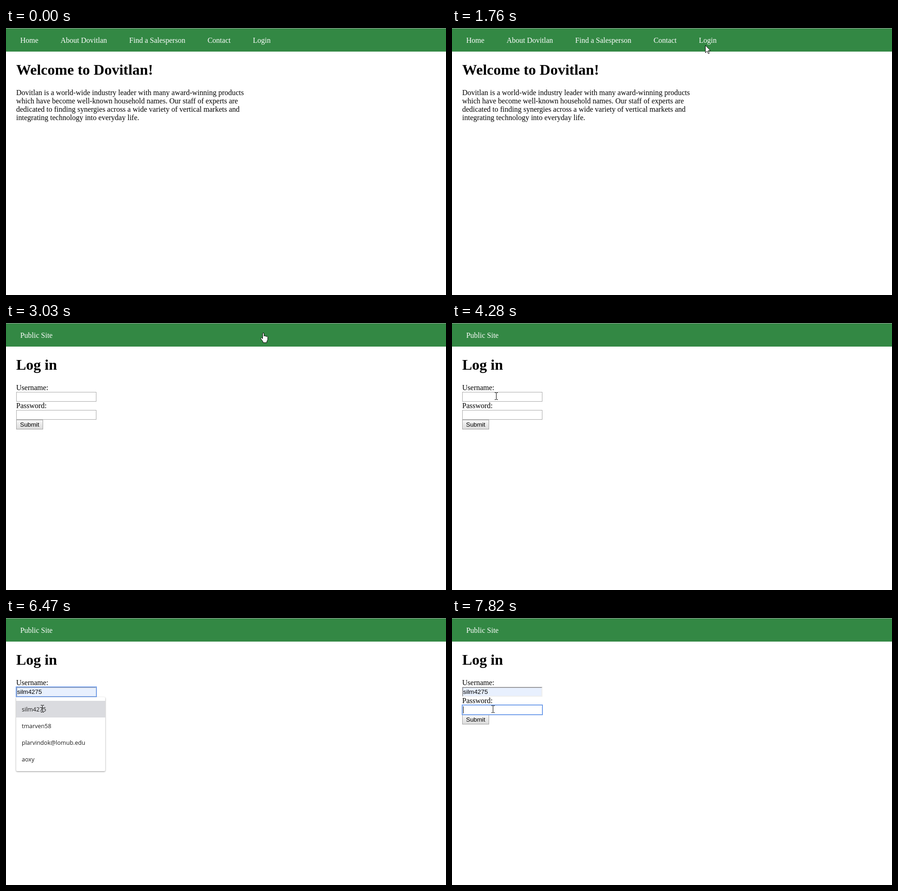
Animation, 949 px wide and 577 px high, one loop 8000 ms. Source, as an HTML page:

```html
<!DOCTYPE html>
<html lang="en">
<head>
<meta charset="utf-8">
<title>Log in</title>
<style>
* { box-sizing: border-box; }
html, body { margin: 0; height: 100%; overflow: hidden; background: #fff; }
body { font: 16px/18px "Liberation Serif", serif; color: #000; }
nav { display: flex; gap: 48px; height: 51px; padding: 17px 30.7px; border-top: 1px solid #a5a5a5; background: #384; color: #fff; }
main { position: absolute; left: 22px; top: 72px; width: 500px; }
h1 { margin: 0 0 23px; font-size: 32px; line-height: 36px; }
.input, .button { height: 21px; font: 13.333px/19px "Liberation Sans", sans-serif; }
.input { width: 173px; border: 1px solid #a9a9a9; }
.filled { border: 2px solid; border-color: #9a9a9e #eee #eee #9a9a9e; background: #e8f0fe; line-height: 17px; }
.focus { outline: 2px solid #74a0ea; outline-offset: -1px; }
.button { width: 58px; border: 1px solid #a0a0a0; background: linear-gradient(#f7f7f7, #dcdcdc); text-align: center; }
#caret { position: absolute; width: 1px; height: 15px; background: #000; }
#list { position: absolute; left: 22px; top: 171px; width: 192px; padding: 8px 0; border-radius: 2px; background: #fff;
  box-shadow: 0 1px 3px rgba(0, 0, 0, .45); font: 12.55px/37px "Open Sans", sans-serif; color: #1c1c1c; }
#list div { height: 36px; padding-left: 12px; }
#list .hover { background: #dadbdf; }
svg { position: absolute; left: 0; top: 0; width: 100%; height: 100%; }
</style>
</head>
<body>
<div id="home">
  <nav><span>Home</span><span>About Dovitlan</span><span>Find a Salesperson</span><span>Contact</span><span>Login</span></nav>
  <main>
    <h1>Welcome to Dovitlan!</h1>
    Dovitlan is a world-wide industry leader with many award-winning products
    which have become well-known household names. Our staff of experts are
    dedicated to finding synergies across a wide variety of vertical markets and
    integrating technology into everyday life.
  </main>
</div>

<div id="login">
  <nav>Public Site</nav>
  <main>
    <h1>Log in</h1>
    <div>Username:</div>
    <div class="input" id="user"></div>
    <div>Password:</div>
    <div class="input" id="pass"></div>
    <div class="button">Submit</div>
  </main>
  <div id="caret"></div>
  <div id="list">
    <div id="first">silm4275</div>
    <div>tmarven58</div>
    <div>plarvindok@lomub.edu</div>
    <div>aoxy</div>
  </div>
</div>

<svg>
  <g id="cursor">
    <circle id="click" cx="-2" cy="-1" r="12" fill="#ff0" fill-opacity=".47"/>
    <path id="arrow" d="M.5 .5V16.5L4.3 13L6.8 18.5L9 17.5L6.6 12H11.5Z" fill="#fff" stroke="#000"/>
    <path id="beam" d="M-3 -7.5H0M1 -7.5H4M.5 -7V7M-3 7.5H0M1 7.5H4" stroke="#000"/>
    <path id="hand" transform="translate(-6)" fill="#fff" stroke="#000"
      d="M5.5 13V2a1.5 1.5 0 0 1 3 0V7.5a1.5 1.3 0 0 1 3 .5a1.3 1.3 0 0 1 2.5 .7a1.3 1.3 0 0 1 2.5 1V15l-2 4v2.5h-8v-2L2 13.5c-1.5-2.5 .5-3.5 2-2z"/>
  </g>
</svg>
<script>
const $ = id => document.getElementById(id);
const show = (id, on) => $(id).style.display = on ? "" : "none";
const within = (t, a, b) => t >= a && t < b;

// Each move: start and end time, then the points of a quadratic curve
const moves = [
  [430, 1230, [848, 546], [295, 180], [392, 132]],
  [1310, 2000, [400, 127], [575, 30], [554, 21]],
  [3560, 4280, [540, 28], [150, 140], [95, 158]],
  [5530, 5530, [93, 159], [93, 159], [93, 159]],
  [5760, 6160, [90, 166], [73, 193], [78, 196]],
  [7340, 7420, [84, 197], [86, 197], [88, 197]]
];
const clicks = [[2310, 2470], [4670, 4830], [6390, 6470], [7580, 7820]];

// The pointer advances along its curve in steps of about 80 ms
function pointer(t) {
  const move = moves.filter(m => t >= m[0]).pop();
  if (!move) return null;
  const [start, end, a, b, c] = move;
  const steps = Math.round((end - start) / 80);
  const p = t >= end ? 1 : Math.floor((t - start) / (end - start) * steps + .2) / steps;
  const q = 1 - p;
  return a.map((v, k) => Math.round(q * q * v + 2 * q * p * b[k] + p * p * c[k]));
}

function shape(t, x, y) {
  if (t < 3560) {
    if (y < 36 && x > 530 && !within(t, 2470, 2640)) return "hand";
    return within(y, 131, 203) && within(x, 22, 514) ? "beam" : "arrow";
  }
  const overField = within(y, 150, 170) || (y > 188 && t >= 6470);
  return overField && within(x, 22, 195) ? "beam" : "arrow";
}

function draw(t) {
  show("home", t < 3030);
  show("login", t >= 3030);

  const filled = t >= 6000, second = t >= 7580, chosen = within(t, 6550, 7030);
  $("user").textContent = filled ? "silm4275" : "";
  $("user").classList.toggle("filled", filled);
  $("user").classList.toggle("focus", t >= 4670 && !second);
  $("pass").classList.toggle("focus", second);
  $("first").classList.toggle("hover", filled);

  show("caret", within(t, 4670, 5220) || within(t, 5760, 6000) || chosen || second);
  $("caret").style.left = (chosen ? 77 : 24) + "px";
  $("caret").style.top = (second ? 191 : 152) + "px";

  show("list", within(t, 4670, 6710));
  $("list").style.opacity = Math.min(1, (6710 - t) / 160);

  const pos = pointer(t);
  show("cursor", pos);
  if (pos) {
    const kind = shape(t, ...pos);
    for (const id of ["arrow", "beam", "hand"]) show(id, id === kind);
    show("click", clicks.some(c => within(t, ...c)));
    $("cursor").setAttribute("transform", `translate(${pos})`);
  }
}

const begin = performance.now();
function tick() {
  draw((performance.now() - begin) % 8000);
  requestAnimationFrame(tick);
}
tick();
</script>
</body>
</html>
```
